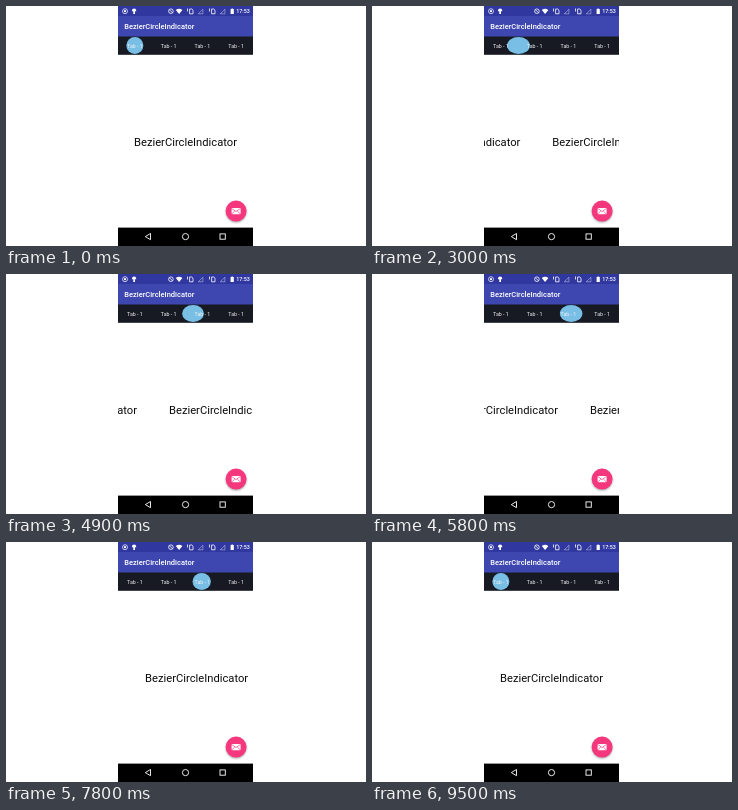
These frames come from a looping animation (360 by 240 pixels, 9900 ms). An HTML page:

```html
<!DOCTYPE html>
<html lang="en">
<head>
<meta charset="utf-8">
<title>BezierCircleIndicator</title>
<style>
  html, body { margin: 0; width: 100%; height: 100%; overflow: hidden; background: #fff; }
  svg { display: block; width: 360px; height: 240px; }
  text { font-family: Roboto, Arial, sans-serif; }
  .title { font-size: 7.5px; font-weight: 500; fill: #fff; }
  .clock { font-size: 5.4px; font-weight: 500; fill: #fff; }
  .tab { font-size: 5.25px; fill: #f2f3f5; text-anchor: middle; }
  .page { font-size: 11.2px; fill: #0c0c0c; text-anchor: middle; }
  .line { fill: none; stroke: #fff; }
</style>
</head>
<body>
<svg viewBox="0 0 360 240">
  <defs>
    <clipPath id="screen"><rect x="112" width="135" height="240"/></clipPath>
    <filter id="blur" x="-30%" y="-30%" width="160%" height="160%"><feGaussianBlur stdDeviation="1"/></filter>
    <g id="sim">
      <path class="line" stroke-width=".8" d="M2.4 3h2.2l1.2 1.2v3.6H2.4z"/>
      <path d="M0 2.4h.8v3H0z" fill="#fff"/>
    </g>
    <path id="signal" class="line" stroke="#fff" stroke-width=".6" opacity=".65" d="M0 7.8h4.6V3.2z"/>
  </defs>
  <g clip-path="url(#screen)">
    <g id="pages"></g>

    <rect x="112" width="135" height="10" fill="#3038a0"/>
    <rect x="112" y="10" width="135" height="21" fill="#3e47af"/>
    <rect x="112" y="30.5" width="135" height="18.3" fill="#171a23"/>
    <text class="title" x="118.2" y="23.3">BezierCircleIndicator</text>

    <!-- status bar -->
    <circle class="line" cx="119" cy="5.2" r="2.5" stroke-width=".7"/>
    <circle cx="119" cy="5.2" r="1.1" fill="#fff"/>
    <path d="M126 4.6a2.1 2.1 0 0 1 4.2 0v.7h-1.2V8h-1.7V5.3H126z" fill="#fff"/>
    <circle class="line" cx="164.9" cy="5.2" r="2.3" stroke-width=".8"/>
    <path class="line" stroke-width=".8" d="M163.3 3.6l3.2 3.2"/>
    <path d="M169.8 4q3.3-2.6 6.6 0L173.1 8z" fill="#fff"/>
    <use href="#sim" x="181.2"/>
    <use href="#signal" x="192.3"/>
    <use href="#sim" x="203.2"/>
    <use href="#signal" x="214.3"/>
    <path d="M224.6 3.1h.9v-.7h1.4v.7h.9V8h-3.2z" fill="#fff"/>
    <text class="clock" x="230.2" y="7.2">17:53</text>

    <ellipse id="blob" cy="39.6" ry="8.5" fill="#79bfe5"/>
    <g id="tabs"></g>

    <!-- action button -->
    <circle cx="230.1" cy="206.2" r="10.4" fill="#000" opacity=".35" filter="url(#blur)"/>
    <circle cx="230.1" cy="205.1" r="10.5" fill="#f5377d"/>
    <rect x="225.6" y="202.1" width="9" height="6.2" rx="1" fill="#fff"/>
    <path d="M226.2 202.8l3.9 2.8 3.9-2.8M226.2 207.7l2.6-2.6M234 207.7l-2.6-2.6" fill="none" stroke="#f5377d" stroke-width=".7"/>

    <!-- navigation bar -->
    <rect x="112" y="221.6" width="135" height="18.4" fill="#000"/>
    <path class="line" stroke-width=".9" stroke-linejoin="round" d="M139.3 230.6l5.2-3.1v6.2z"/>
    <circle class="line" cx="179.5" cy="230.6" r="3.1" stroke-width=".9"/>
    <rect class="line" x="214" y="227.9" width="5.3" height="5.3" stroke-width=".9"/>
  </g>
</svg>
<script>
const LOOP = 9900, STEP = 100;
const LEFT = 112, WIDTH = 135, TABS = 4, GAP = WIDTH / TABS;
const RADIUS = 8.5, STRETCH = 5.8, HOLD = 0.35;

// start, end, page before, page after
const swipes = [
  [1500, 2100, 0, 0.333],
  [2100, 3100, 0.333, 0.62],
  [3200, 4000, 0.62, 1],
  [4300, 5200, 1, 2],
  [5400, 6433, 2, 3],
  [6600, 7483, 3, 2],
  [7650, 8500, 2, 1],
  [8600, 9450, 1, 0]
];

const byId = id => document.getElementById(id);
const clamp = v => Math.min(1, Math.max(0, v));
const smooth = u => u * u * (3 - 2 * u);

function addText(parent, className, x, y, content) {
  const node = document.createElementNS("http://www.w3.org/2000/svg", "text");
  node.setAttribute("class", className);
  node.setAttribute("x", x);
  node.setAttribute("y", y);
  node.textContent = content;
  parent.append(node);
}

const pages = byId("pages"), tabs = byId("tabs"), blob = byId("blob");
for (let i = 0; i < TABS; i++) {
  addText(pages, "page", LEFT + WIDTH * (i + 0.5), 139.5, "BezierCircleIndicator");
  addText(tabs, "tab", LEFT + GAP * (i + 0.5), 41.7, "Tab - 1");
}

function scrollAt(time) {
  let page = 0, dir = 1;
  for (const [start, end, a, b] of swipes) {
    if (time < start) break;
    page = a + (b - a) * smooth(clamp((time - start) / (end - start)));
    dir = Math.sign(b - a);
  }
  return { page, dir };
}

function draw(time) {
  const { page, dir } = scrollAt(time);
  const from = dir > 0 ? Math.floor(page) : Math.ceil(page);
  const progress = Math.abs(page - from);
  // The leading edge stretches first, then the whole blob travels and rounds off again.
  const travel = GAP * clamp((progress - HOLD) / (0.95 - HOLD));
  const stretch = STRETCH * Math.min(clamp(progress / HOLD), clamp((0.95 - progress) / 0.25));
  const centre = LEFT + GAP * (from + 0.5) + dir * (travel + stretch / 2);

  blob.setAttribute("cx", centre);
  blob.setAttribute("rx", RADIUS + stretch / 2);
  pages.setAttribute("transform", `translate(${-page * WIDTH} 0)`);
}

const began = performance.now();
function tick() {
  const time = (performance.now() - began) % LOOP;
  draw(Math.floor(time / STEP) * STEP);
  requestAnimationFrame(tick);
}
draw(0);
requestAnimationFrame(tick);
</script>
</body>
</html>
```
